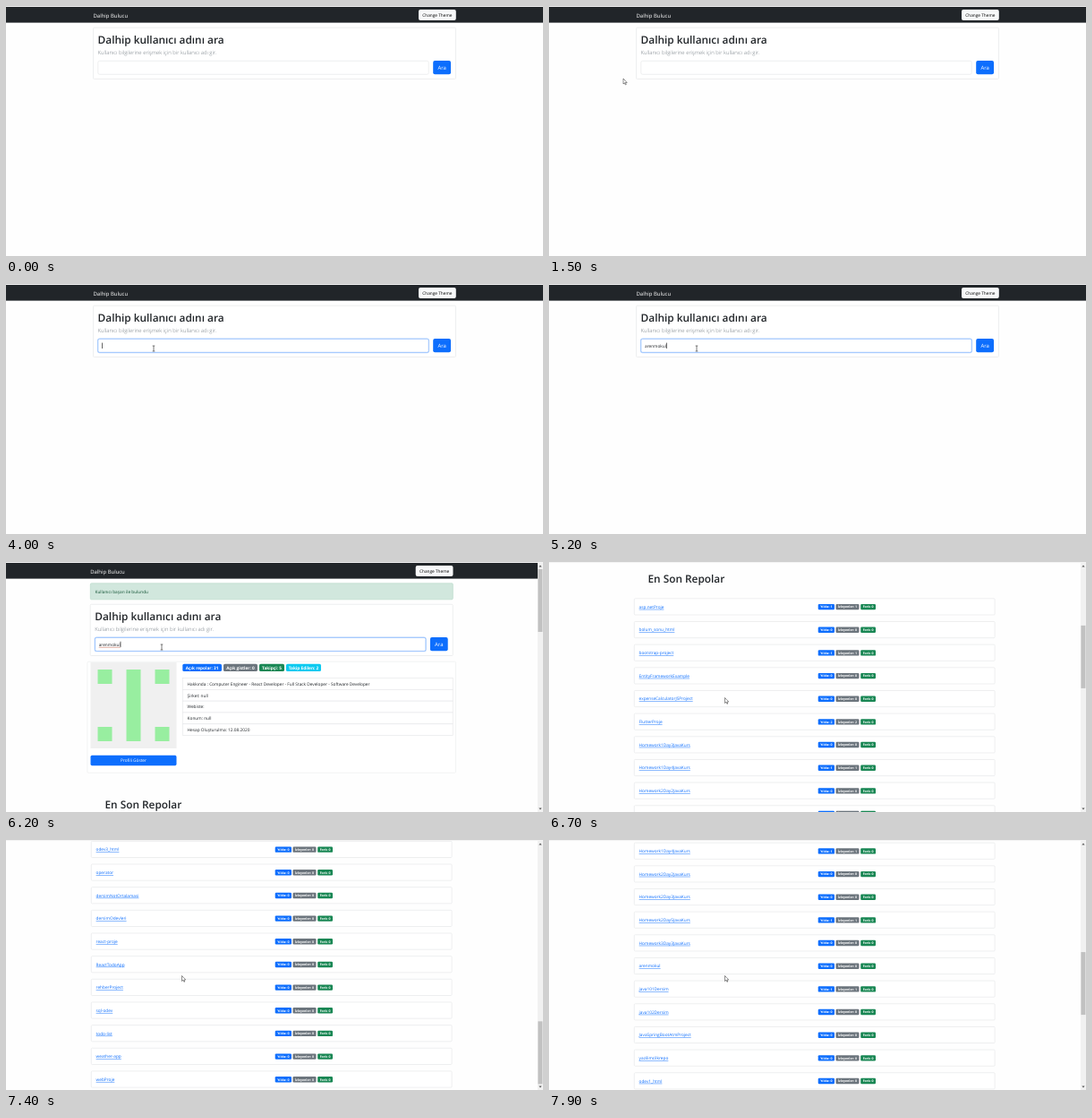
Animation of 600 by 279 pixels, one loop 8 s. Source, as an HTML page:

```html
<!DOCTYPE html>
<html lang="tr">
<head>
<meta charset="utf-8">
<title>Dalhip Bulucu</title>
<style>
  html, body { margin: 0; width: 100%; height: 100%; overflow: hidden; background: #fefefe; }
  svg { display: block; width: 600px; height: 279px; }
  text { font-family: "Open Sans", "Noto Sans", sans-serif; text-rendering: geometricPrecision; white-space: pre; }
</style>
</head>
<body>
<svg id="stage" viewBox="0 0 600 279"></svg>
<script>
const LOOP = 8000, USER = "arenmokul";
const INK = "#212529", BLUE = "#0d6efd", GRAY = "#6c757d", GREEN = "#198754", CYAN = "#0dcaf0", LINE = "#e7e8ea";
const ROW_TOP = 302, ROW_STEP = 25.66, MAX_SCROLL = 779;

// Repository names; a trailing *n gives the star count.
const repos = `asp.netProje*1 bolum_sonu_html bootstrap-project*1 EntityFrameworkExample
  expenseCalculatorJSProject FlutterProje*2 Homework1Day3JavaKurs Homework1Day4JavaKurs*1
  Homework2Day2JavaKurs Homework2Day3JavaKurs Homework2Day5JavaKurs*1 Homework3Day3JavaKurs
  ${USER} java101Dersim*1 java102Dersim JavaSpringBootAtmProject yazilimcilkrepo odev1_html
  Odev2Gun1JavaKurs odev3_html operator dersimNotOrtalamasi dersimOdevleri react-proje
  ReactTodoApp rehberProject sql-odev todo-list weather-app webProje`.split(/\s+/);

const rect = (x, y, w, h, fill, stroke = "none", r = 0, attrs = "") =>
  `<rect x="${x}" y="${y}" width="${w}" height="${h}" rx="${r}" fill="${fill}" stroke="${stroke}" stroke-width=".7" ${attrs}/>`;
const text = (x, y, str, size = 4.75, fill = INK, attrs = "") =>
  `<text x="${x}" y="${y}" font-size="${size}" fill="${fill}" ${attrs}>${str}</text>`;
const pill = (x, y, w, h, fill, label, size, weight = 400, r = 1.6) =>
  rect(x, y, w, h, fill, "none", r) +
  text(x + w / 2, y + h / 2 + size * .36, label, size, "#fff", `text-anchor="middle" font-weight="${weight}"`);

const nav = rect(-10, 1, 630, 17.6, INK) +
  text(97.5, 12.6, "Dalhip Bulucu", 5.94, "#fff") +
  rect(461, 4, 41.8, 12, "#f8f9fa", "none", 2) +
  text(481.9, 11.8, "Change Theme", 4.75, "#000", 'text-anchor="middle"');

const search = rect(97.5, 24.2, 405, 57.2, "#fff", LINE, 1) +
  text(102.6, 41.6, "Dalhip kullanıcı adını ara", 11.85, INK, 'font-weight="600"') +
  text(102.6, 53.7, "Kullanıcı bilgilerine erişmek için bir kullanıcı adı gir.", 5.94, GRAY, 'font-weight="300"') +
  rect(101.9, 60.4, 371.2, 16.8, "none", "none", 2.6, 'id="glow"') +
  rect(102.8, 61.3, 369.4, 15, "#fff", LINE, 1.8, 'id="field"') +
  text(107, 70.6, "", 4.75, INK, 'id="typed"') +
  '<path id="squiggle" d="M107 72.2h24" stroke="#c0604a" stroke-width=".5"/>' +
  rect(0, 65.6, .6, 6.4, "#000", "none", 0, 'id="caret"') +
  pill(477.2, 61, 19.8, 15.2, BLUE, "Ara", 5.94, 400, 2);

const about = ["Hakkında : Computer Engineer - React Developer - Full Stack Developer - Software Developer",
  "Şirket: null", "Webiste:", "Konum: null", "Hesap Oluşturulma: 12.08.2020"];

const avatar = rect(94.5, 112, 96, 96, "#f0f0f0") + rect(134.5, 120, 16, 80, "#98eea0") +
  [102.5, 166.5].map(x => [120, 184].map(y => rect(x, y, 16, 16, "#98eea0")).join("")).join("");

const profile = rect(94.3, 23.8, 405, 18, "#d1e7dd", "#badbcc", 1.2) +
  text(99.5, 34.8, "Kullanıcı başarı ile bulundu", 4.75, "#0f5132") +
  rect(91, 111.3, 411.5, 124, "#fff", "#eeeff0", 1) + avatar +
  pill(94.5, 215.8, 96, 11.4, BLUE, "Profili Göster", 4.75) +
  pill(197.3, 113.8, 43.7, 8.2, BLUE, "Açık repolar: 31", 4.75, 700) +
  pill(243, 113.8, 38, 8.2, GRAY, "Açık gistler: 0", 4.75, 700) +
  pill(283, 113.8, 28, 8.2, GREEN, "Takipçi: 5", 4.75, 700) +
  pill(313, 113.8, 39, 8.2, CYAN, "Takip Edilen: 2", 4.75, 700) +
  about.map((line, i) => rect(197.3, 129.5 + 12.82 * i, 301.9, 12.82, "#fff", LINE) +
    text(202.6, 137.8 + 12.82 * i, line)).join("") +
  text(110.5, 275.4, "En Son Repolar", 11.85, INK, 'font-weight="600"');

const repoRow = (entry, i) => {
  const [name, stars = 0] = entry.split("*"), y = ROW_TOP + ROW_STEP * i;
  return rect(95.3, y - 9.2, 402.8, 18.2, "#fff", LINE, 1) +
    text(100.6, y + 1.8, name, 4.75, BLUE, 'text-decoration="underline"') +
    pill(300.7, y - 3.1, 18.3, 6.4, BLUE, `Yıldız: ${stars}`, 3.56, 700, 1.2) +
    pill(320.5, y - 3.1, 26, 6.4, GRAY, `İzleyenler: ${stars}`, 3.56, 700, 1.2) +
    pill(348.2, y - 3.1, 16.8, 6.4, GREEN, "Fork: 0", 3.56, 700, 1.2);
};

const scrollbar = rect(594, 1, 6, 278, "#f1f1f1") + rect(594.4, 8, 5, 70, "#c1c1c1", "none", 0, 'id="thumb"') +
  '<path d="M595.4 5.6l1.6-2 1.6 2zM595.4 274.6l1.6 2 1.6-2z" fill="#555"/>';

document.getElementById("stage").innerHTML =
  `<g id="page"><g id="nav">${nav}</g><g id="results">${profile}${repos.map(repoRow).join("")}</g>
   <g id="search">${search}</g></g><g id="scrollbar">${scrollbar}</g>
   ${rect(0, 0, 600, 1, "#f3f3f3")}
   <path id="arrow" d="M0 0v6l1.4-1.2 1 2.1.9-.4-1-2H4.2z" fill="#fff" stroke="#222" stroke-width=".5"/>
   <path id="beam" d="M-1.3-3h2.6M0-3v6M-1.3 3h2.6" fill="none" stroke="#444" stroke-width=".7"/>`;

const el = Object.fromEntries([...document.querySelectorAll("[id]")].map(node => [node.id, node]));
const set = (id, name, value) => el[id].setAttribute(name, value);
const show = (id, on) => set(id, "display", on ? "inline" : "none");
const move = (id, x, y) => set(id, "transform", `translate(${x} ${y})`);

// Keys are [time, ...values], joined by straight segments.
const pointer = [[100, 120, 64], [500, 83, 81], [1800, 83, 81], [2000, 53, 104], [2200, 53, 104], [2400, 60, 111],
  [2800, 157, 80], [2900, 160.5, 77], [3100, 160.5, 77], [3400, 165, 72], [5400, 165, 72], [5500, 174, 95],
  [6200, 174, 95], [6500, 196.5, 151.5]];
const scrolling = [[6200, 0], [6300, 20], [6500, 120], [6700, 252], [7100, 586.6],
  [7400, MAX_SCROLL], [7500, MAX_SCROLL], [7900, 469.3]];

function sample(keys, t) {
  const next = keys.findIndex(key => key[0] > t);
  if (next < 0) return keys[keys.length - 1].slice(1);
  if (next === 0) return keys[0].slice(1);
  const a = keys[next - 1], b = keys[next], k = (t - a[0]) / (b[0] - a[0]);
  return a.slice(1).map((v, i) => v + (b[i + 1] - v) * k);
}

function draw(now) {
  const t = Math.floor(now % LOOP / 100) * 100;
  const found = t >= 5400, focused = t >= 3400;
  const [scroll] = sample(scrolling, t), [x, y] = sample(pointer, t);

  move("page", 0, -scroll);
  move("nav", found ? -3.3 : 0, 0);
  move("search", found ? -3.3 : 0, found ? 23.1 : 0);
  show("results", found);
  show("scrollbar", found);
  set("thumb", "y", 8 + scroll * .2495);

  set("field", "stroke", focused ? "#86b7fe" : LINE);
  set("glow", "fill", focused ? "#c2dbfe" : "none");
  el.typed.textContent = USER.slice(0, t < 4200 ? 0 : t < 4900 ? (t - 4100) / 100 : 9);
  show("squiggle", found);
  set("caret", "x", 107 + (t < 4200 ? 0 : el.typed.getComputedTextLength()));
  show("caret", focused && ![3900, 5100, 5700].includes(t));

  const overText = t >= 2700 && t < 6300;
  show("beam", overText);
  show("arrow", t >= 100 && !overText);
  move("beam", x, y);
  move("arrow", x, y);
}

const start = performance.now();
(function tick() {
  draw(performance.now() - start);
  requestAnimationFrame(tick);
})();
</script>
</body>
</html>
```
